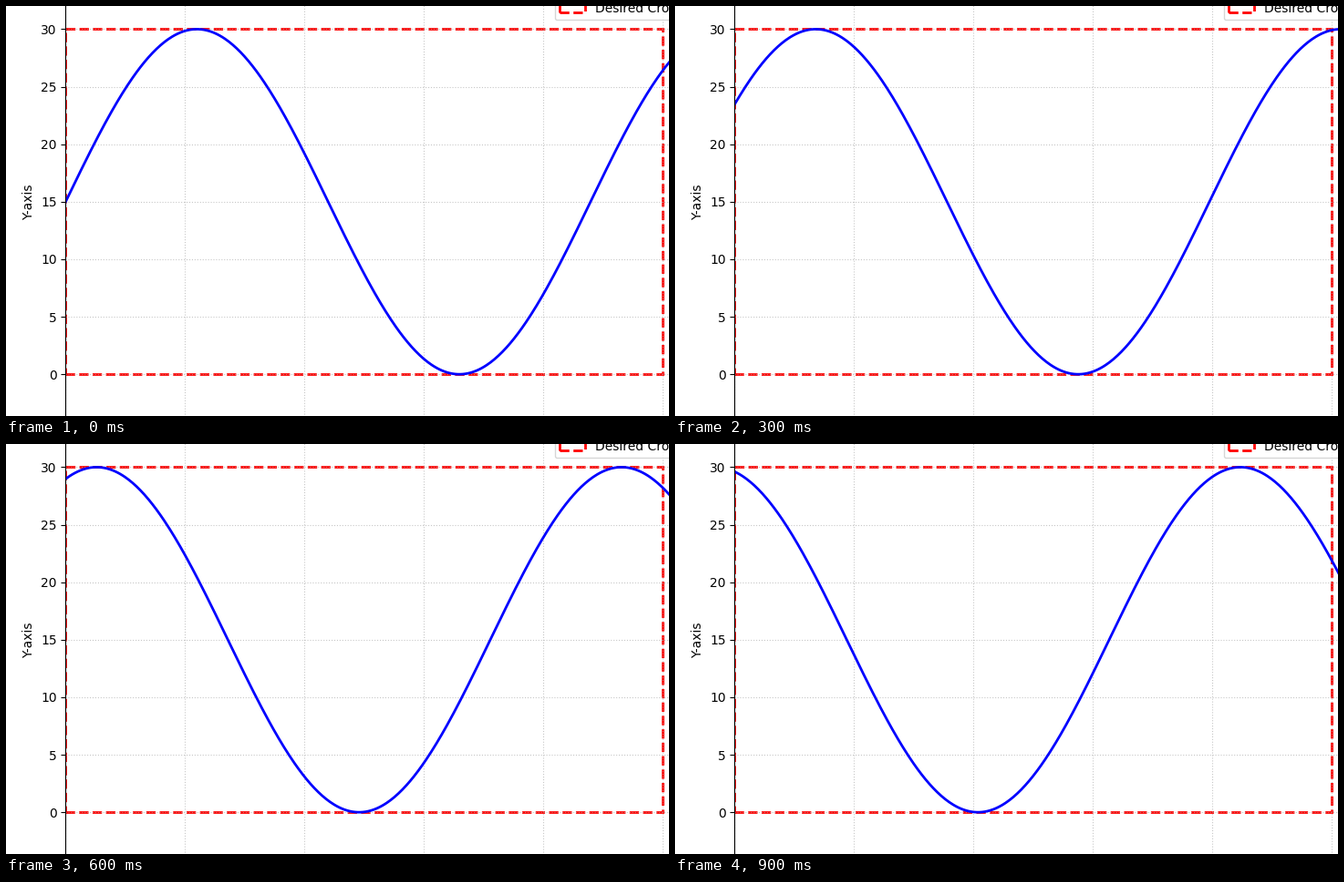
Animation of 727x450 px, one loop 1000 ms. Source, as a matplotlib script:

```python
import numpy as np
import matplotlib.pyplot as plt
from matplotlib.animation import FuncAnimation
from matplotlib.patches import Rectangle

WIDTH, HEIGHT, DPI = 727, 450, 100
FRAMES, INTERVAL = 10, 100
PHASE_STEP = 0.2

# Axes edges in pixels from the top left; the axes run past the stage.
LEFT, RIGHT = 65.4, 785.2
TOP, BOTTOM = -37.7, 467.3

plt.rcParams["font.family"] = "DejaVu Sans"
fig = plt.figure(figsize=(WIDTH / DPI, HEIGHT / DPI), dpi=DPI)
ax = fig.add_axes([LEFT / WIDTH, 1 - BOTTOM / HEIGHT,
                   (RIGHT - LEFT) / WIDTH, (BOTTOM - TOP) / HEIGHT])
ax.set_xlim(0, 55)
ax.set_ylim(-5, 35)
ax.set_yticks(range(0, 31, 5))
ax.set_ylabel("Y-axis")
ax.grid(True, linestyle=":", alpha=0.7)

x = np.linspace(0, 55, 500)


def wave(frame):
    return 15 + 15 * np.sin(x / 7 + PHASE_STEP * frame)


line, = ax.plot(x, wave(0), color="blue", lw=2, label="Wave")
ax.add_patch(Rectangle((0, 0), 50, 30, fill=False, edgecolor="red",
                       lw=2, linestyle="--", label="Desired Crop Area"))
ax.legend(loc="upper right")


def update(frame):
    line.set_ydata(wave(frame))
    return line,


anim = FuncAnimation(fig, update, frames=FRAMES, interval=INTERVAL,
                     repeat=True, repeat_delay=0)
plt.show()
```
